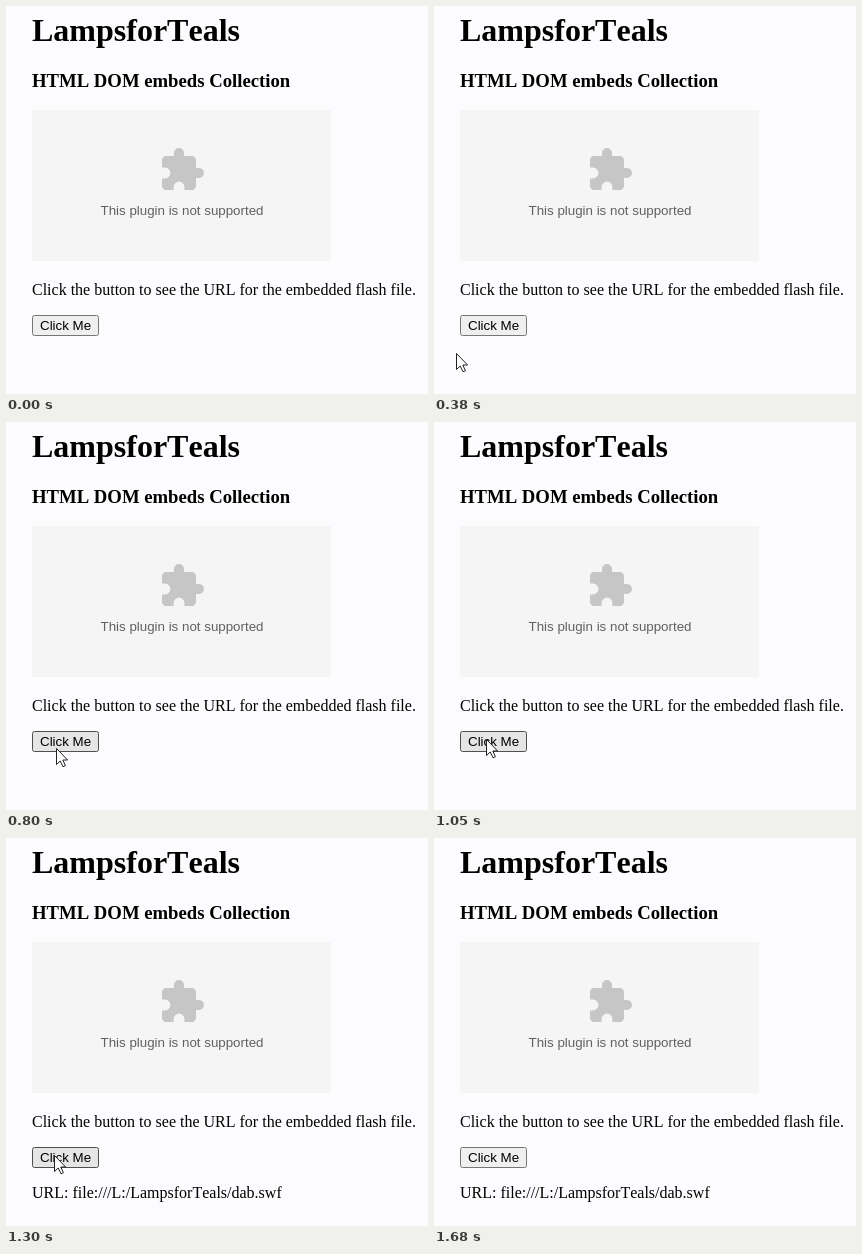
Recreate the animation shown at these times as an HTML page. Size 422 px wide and 388 px high, loop 2.56 s.

```html
<!DOCTYPE html>
<html lang="en">
<head>
<meta charset="utf-8">
<title>Embeds collection</title>
<style>
  html, body { margin: 0; width: 100%; height: 100%; overflow: hidden; background: #fcfcff; }
  svg { display: block; width: 422px; height: 388px; }
  text { font-family: "Liberation Serif", "Times New Roman", serif; font-size: 16px; font-kerning: none; white-space: pre; }
  .sans { font-family: "Liberation Sans", Arial, sans-serif; font-size: 13.333px; }
  .h1 { font-size: 32px; font-weight: bold; }
  .h3 { font-size: 18.72px; font-weight: bold; }
  #button { fill: #efefef; stroke: #767676; }
  #button.hover { fill: #e5e5e5; stroke: #4f4f4f; }
</style>
</head>
<body>
<svg viewBox="0 0 422 388">
  <text class="h1" x="26" y="35">LampsforTeals</text>
  <text class="h3" x="26" y="81">HTML DOM embeds Collection</text>

  <rect x="26" y="104" width="299" height="151" fill="#f5f5f5"/>
  <path transform="translate(152 140) scale(2)" fill="#c6c6c6"
    d="M20.5 11H19V7c0-1.1-.9-2-2-2h-4V3.5a2.5 2.5 0 0 0-5 0V5H4c-1.1 0-2 .9-2 2v3.8h1.5a2.7 2.7 0 0 1 0 5.4H2V20c0 1.1.9 2 2 2h3.8v-1.5a2.7 2.7 0 0 1 5.4 0V22H17c1.1 0 2-.9 2-2v-4h1.5a2.5 2.5 0 0 0 0-5z"/>
  <text class="sans" x="176" y="209" text-anchor="middle" fill="#606060">This plugin is not supported</text>

  <text x="26" y="289">Click the button to see the URL for the embedded flash file.</text>

  <rect id="button" x="26.5" y="309.5" width="66" height="20" rx="2"/>
  <text class="sans" x="34" y="324">Click Me</text>
  <text id="url" x="26" y="360">URL: file:///L:/LampsforTeals/dab.swf</text>

  <path id="cursor" d="M.5 .5V16.5L4.2 13L7 18.8L9.4 17.7L6.8 12H11.6Z"
    fill="#fff" stroke="#222" stroke-linejoin="round"/>
</svg>
<script>
  const LOOP = 2560, URL_AT = 1220, HIDE_AT = 1680;
  const FIRST = 120, STEP = 125 / 3;

  // Key points of the pointer's path
  const path = [
    { t: 200, x: -6, y: 358 },
    { t: 245, x: 2, y: 356 },
    { t: 535, x: 48, y: 334 },
    { t: 625, x: 49, y: 334 },
    { t: 785, x: 50, y: 326 },
    { t: 1035, x: 52, y: 317 },
    { t: 1285, x: 48, y: 317 },
    { t: 1640, x: 12, y: 349 }
  ];

  const [button, url, cursor] = ["button", "url", "cursor"].map(id => document.getElementById(id));
  const show = (el, on) => el.setAttribute("visibility", on ? "visible" : "hidden");

  // The pointer moves in whole steps and whole pixels
  function pointerAt(time) {
    const t = FIRST + Math.floor((time - FIRST) / STEP) * STEP;
    if (t < path[0].t || time >= HIDE_AT) return null;
    const i = path.findIndex(p => p.t > t);
    if (i < 0) return path[path.length - 1];
    const a = path[i - 1], b = path[i], k = (t - a.t) / (b.t - a.t);
    const mix = key => Math.round(a[key] + (b[key] - a[key]) * k);
    return { x: mix("x"), y: mix("y") };
  }

  const overButton = ({ x, y }) => x >= 26 && x < 93 && y >= 309 && y < 330;

  function draw(t) {
    const p = pointerAt(t);
    show(cursor, p);
    show(url, t >= URL_AT);
    if (p) cursor.setAttribute("transform", `translate(${p.x} ${p.y})`);
    button.classList.toggle("hover", !!p && overButton(p));
  }

  const start = performance.now();
  function tick() {
    draw((performance.now() - start) % LOOP);
    requestAnimationFrame(tick);
  }
  tick();
</script>
</body>
</html>
```
